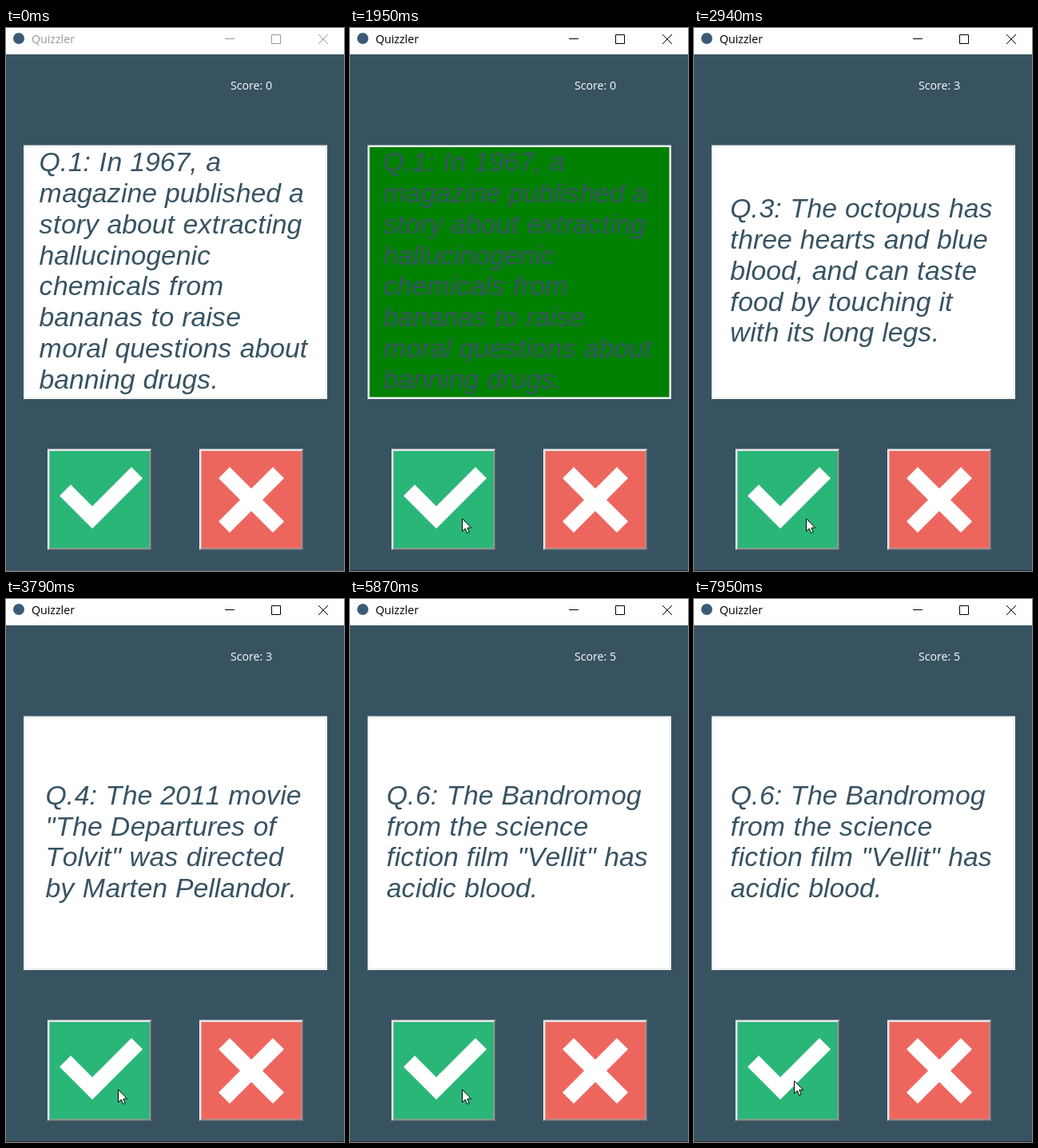
Animation of 423x679 px, one loop 8000 ms. Source, as an HTML page with a canvas:

```html
<!DOCTYPE html>
<html lang="en">
<head>
<meta charset="utf-8">
<title>Quizzler</title>
<style>
  html, body { margin: 0; width: 100%; height: 100%; overflow: hidden; background: #375362; }
  canvas { display: block; }
</style>
</head>
<body>
<canvas id="stage" width="423" height="679"></canvas>
<script>
const ctx = document.getElementById('stage').getContext('2d');
const LOOP = 8000, STEP = 70;
const THEME = '#375362';
const UI_FONT = '14.2px "Open Sans", "Noto Sans", sans-serif';

// The window content is laid out in whole units, shown at 125 %
const UNIT = 1.25;
const EM = 27, LINE = 31 * UNIT;
const cardFont = size => `italic ${size}px "Liberation Sans", Arial, sans-serif`;

const cards = [
  { at: 0, score: 0, lines: ['Q.1: In 1967, a', 'magazine published a', 'story about extracting',
    'hallucinogenic', 'chemicals from', 'bananas to raise', 'moral questions about', 'banning drugs.'] },
  { at: 2020, score: 2, lines: ['Q.2: You could walk', 'from Norway to North',
    'Korea while only', 'passing through', 'Russia.'] },
  { at: 2940, score: 3, lines: ['Q.3: The octopus has', 'three hearts and blue',
    'blood, and can taste', 'food by touching it', 'with its long legs.'] },
  { at: 3790, score: 3, lines: ['Q.4: The 2011 movie', '"The Departures of',
    'Tolvit" was directed', 'by Marten Pellandor.'] },
  { at: 5150, score: 5, lines: ['Q.5: Bananas are', 'technically classed',
    'as berries, while', 'strawberries are not.'] },
  { at: 5870, score: 5, lines: ['Q.6: The Bandromog', 'from the science',
    'fiction film "Vellit" has', 'acidic blood.'] }
];
const FOCUS = 970;
const presses = [[970, 1030], [1820, 1950], [2680, 2810], [4010, 4080], [4740, 4880], [7890, 7950]];
const correct = [[1030, 2020], [2810, 2940], [4140, 5150]];

const TICK = [[67, 585], [81, 571], [108, 598], [157, 549], [171, 563], [108, 626]];
const CROSS = [[266, 563], [280, 549], [307, 576], [334, 549], [348, 563], [321, 590],
  [348, 617], [334, 631], [307, 604], [280, 631], [266, 617], [293, 590]];
const ARROW = [[0.5, 0.5], [0.5, 16.5], [4.2, 13], [6.8, 18.6], [9.2, 17.5], [6.8, 12], [11.6, 12]];

const within = (spans, t) => spans.some(([a, b]) => t >= a && t < b);

function rect(x, y, w, h, color) {
  ctx.fillStyle = color;
  ctx.fillRect(x, y, w, h);
}

function poly(points, dx, dy, fill, stroke) {
  ctx.beginPath();
  points.forEach(([x, y]) => ctx.lineTo(x + dx, y + dy));
  ctx.closePath();
  ctx.fillStyle = fill;
  ctx.fill();
  if (stroke) {
    ctx.strokeStyle = stroke;
    ctx.lineWidth = 1;
    ctx.stroke();
  }
}

function disc(x, y, r, color) {
  ctx.beginPath();
  ctx.arc(x, y, r, 0, Math.PI * 2);
  ctx.fillStyle = color;
  ctx.fill();
}

function label(text, x, y, color) {
  ctx.font = UI_FONT;
  ctx.fillStyle = color;
  ctx.fillText(text, x, y);
}

// Letters advance by whole units, as in hinted text
function layout(text) {
  ctx.font = cardFont(EM);
  let width = 0;
  const letters = [...text].map(ch => {
    const letter = { ch, x: width };
    width += Math.floor(ctx.measureText(ch).width + 0.51) * UNIT;
    return letter;
  });
  return { letters, width };
}

for (const card of cards) {
  card.rows = card.lines.map(layout);
  card.x = 209.5 - Math.max(...card.rows.map(r => r.width)) / 2;
}

function titleBar(active) {
  const ink = active ? '#000' : '#999';
  rect(0, 0, 423, 33, '#fff');
  disc(16, 13, 7, '#3b5a78');
  label('Quizzler', 32, 19, ink);
  ctx.strokeStyle = ink;
  ctx.lineWidth = 1;
  ctx.beginPath();
  ctx.moveTo(274, 13.5);
  ctx.lineTo(286, 13.5);
  ctx.rect(332.5, 8.5, 11, 11);
  ctx.moveTo(391, 8);
  ctx.lineTo(403, 20);
  ctx.moveTo(403, 8);
  ctx.lineTo(391, 20);
  ctx.stroke();
}

function drawCard(card, green) {
  rect(22, 146.5, 380, 317.5, '#f0f0f0');
  rect(24.5, 149, 375, 312.5, green ? '#008000' : '#fff');
  const top = 314.9 - (card.rows.length - 1) * LINE / 2;
  ctx.font = cardFont(EM * UNIT);
  ctx.fillStyle = THEME;
  card.rows.forEach((row, i) => {
    for (const { ch, x } of row.letters) ctx.fillText(ch, card.x + x, top + i * LINE);
  });
}

function ring(x, y, w, h, upper, lower) {
  rect(x, y, w, h, lower);
  poly([[0, 0], [w, 0], [w - UNIT, UNIT], [UNIT, h - UNIT], [0, h]], x, y, upper);
}

function button(x, color, icon, down) {
  const y = 526.5, w = 130, h = 126.25, u = UNIT;
  const d = down ? u : 0;
  const outer = down ? ['#a0a0a0', '#fff'] : ['#fff', '#696969'];
  const inner = down ? ['#696969', '#e3e3e3'] : ['#e3e3e3', '#a0a0a0'];
  ring(x, y, w, h, ...outer);
  ring(x + u, y + u, w - 2 * u, h - 2 * u, ...inner);
  rect(x + 2 * u, y + 2 * u, w - 4 * u, h - 4 * u, color);
  poly(icon, d, d, '#fff');
}

// The pointer is sampled at a fixed interval
function pointer(t) {
  if (t < 180) return null;
  const part = (start, n) => Math.max(0, Math.min(1, (Math.floor((t - start) / STEP) + 1) / n));
  if (t < 7210) {
    const k = 1 - part(180 + STEP, 6);
    return [140 + 110 * k ** 1.5, 613 + 44 * k ** 1.5];
  }
  const k = part(7210, 4);
  return [140 - 15 * k, 613 - 11 * k];
}

function draw(t) {
  const active = t >= FOCUS;
  const down = within(presses, t);
  const card = cards.filter(c => t >= c.at).pop();

  rect(0, 0, 423, 679, THEME);
  titleBar(active);
  rect(0, 678, 423, 1, active ? '#20282c' : '#55565a');
  label('Score: ' + card.score, 281, 77, '#fff');
  drawCard(card, within(correct, t));
  button(52, '#2ab678', TICK, down);
  button(242, '#ed665d', CROSS, false);

  const tip = pointer(t);
  if (!tip) return;
  const [x, y] = tip.map(Math.round);
  poly(ARROW, x, y, '#fff', '#000');
  if (down) disc(x, y + 1, 15, 'rgba(255, 255, 0, 0.5)');
}

const begin = performance.now();
function frame() {
  draw((performance.now() - begin) % LOOP);
  requestAnimationFrame(frame);
}
frame();
</script>
</body>
</html>
```
